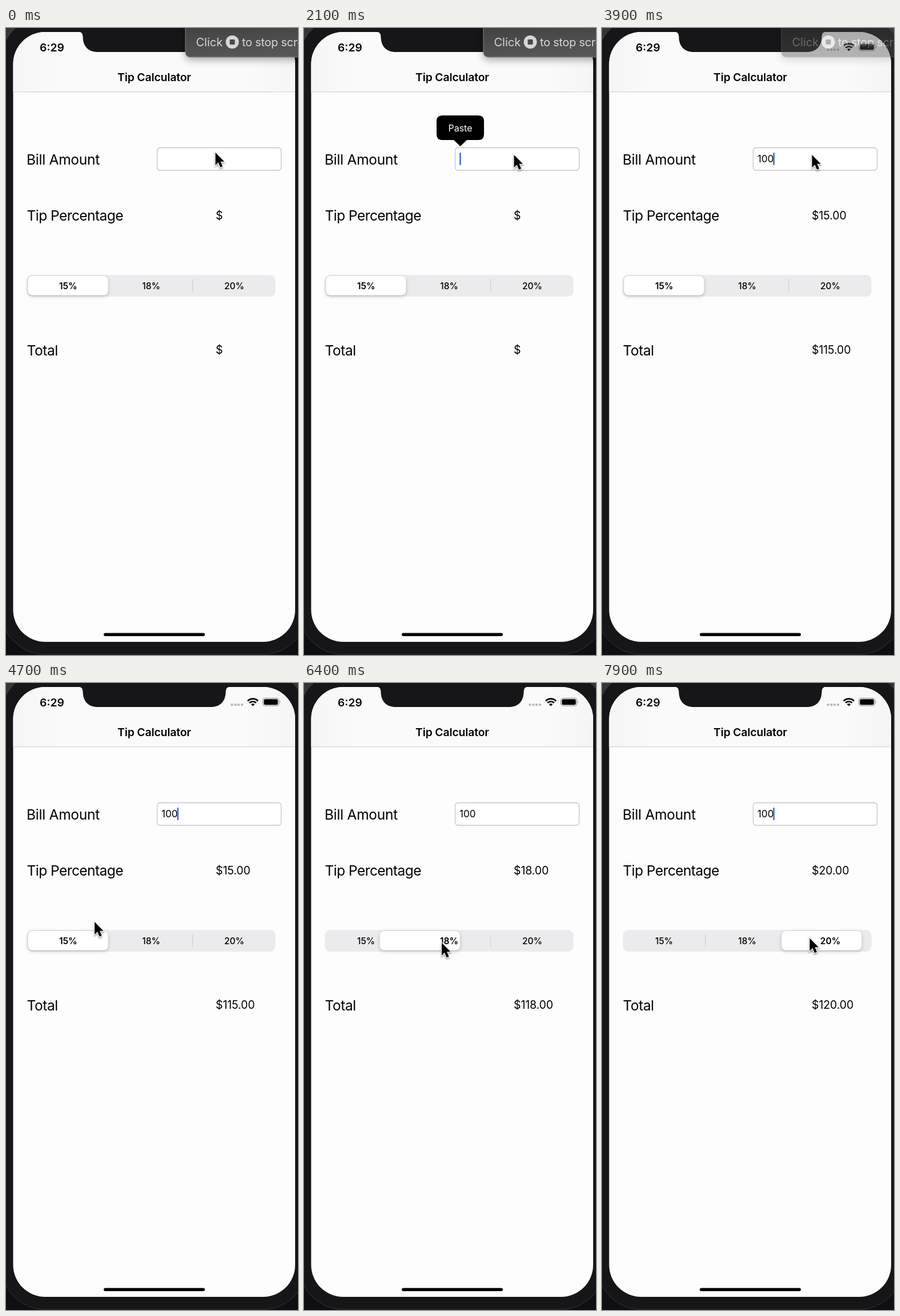
Recreate the animation shown at these times as an HTML page. Size 511 by 1097 pixels, loop 8 s.

```html
<!DOCTYPE html>
<html lang="en">
<head>
<meta charset="utf-8">
<title>Tip Calculator</title>
<style>
  html, body { margin: 0; width: 100%; height: 100%; overflow: hidden; background: #0e0f12; }
  svg { display: block; width: 511px; height: 1097px; font-family: Inter, Roboto, sans-serif; }
  .label { font-size: 24.5px; }
  .amount { font-size: 19.5px; letter-spacing: -.1px; }
  .segment { font-size: 15.5px; font-weight: 500; text-anchor: middle; }
  .bold { font-size: 19.3px; font-weight: 600; }
  .soft { filter: drop-shadow(0 2px 3px rgba(0, 0, 0, .22)); }
  #cursor { filter: drop-shadow(0 2px 1.5px rgba(0, 0, 0, .4)); }
  #toast { filter: drop-shadow(0 4px 7px rgba(0, 0, 0, .35)); }
</style>
</head>
<body>
<svg viewBox="0 0 511 1097">
  <defs>
    <linearGradient id="nav">
      <stop offset="0" stop-color="#f5f5f6"/><stop offset=".17" stop-color="#fafafb"/>
      <stop offset=".83" stop-color="#fafafb"/><stop offset="1" stop-color="#f5f5f6"/>
    </linearGradient>
    <linearGradient id="toastFill" x2=".3" y2="1">
      <stop offset="0" stop-color="#3e3e3f"/><stop offset="1" stop-color="#565657"/>
    </linearGradient>
    <clipPath id="screen"><rect x="12.5" y="7" width="493.5" height="1067" rx="56"/></clipPath>
    <clipPath id="wedge"><path d="M432 40.5L416 24.5H448Z"/></clipPath>
  </defs>

  <rect width="511" height="60" fill="#34373a"/>
  <rect x="-9" y="-20" width="536" height="1116" rx="78" fill="#161517" stroke="#363638"/>
  <g clip-path="url(#screen)">
    <rect width="511" height="1097" fill="#fefdfe"/>
    <rect width="511" height="111" fill="url(#nav)"/>
    <rect y="111" width="511" height="1.2" fill="#d3d3d6"/>
  </g>
  <path d="M127 6.5Q134.500 7 134.500 15C134.500 32 144 42 161 42H358C375 42 384.500 32 384.500 15Q384.500 7 392 6.500Z" fill="#161517"/>
  <rect x="171" y="1058.500" width="177" height="5.500" rx="2.750"/>

  <text class="bold" x="59" y="40.500">6:29</text>
  <text class="bold" x="259.500" y="92.500" text-anchor="middle" letter-spacing="-.1">Tip Calculator</text>
  <g fill="#b9b9bc">
    <circle cx="395.500" cy="38" r="2.200"/><circle cx="401.500" cy="38" r="2.200"/>
    <circle cx="407" cy="38" r="2.200"/><circle cx="413" cy="38" r="2.200"/>
  </g>
  <g clip-path="url(#wedge)" fill="none" stroke="#000" stroke-width="2.800">
    <circle cx="432" cy="40.500" r="12.800"/><circle cx="432" cy="40.500" r="8.200"/>
    <circle cx="432" cy="40.500" r="2.300" stroke-width="4.600"/>
  </g>
  <rect x="449.500" y="26.500" width="28" height="13.500" rx="4" fill="none" stroke="#8e8e90" stroke-width="1.200"/>
  <rect x="451.300" y="28.300" width="24.400" height="9.900" rx="2.300"/>
  <path d="M479 31Q481 33.200 479 35.500Z" fill="#8e8e90"/>

  <text class="label" x="36" y="239" letter-spacing="-.25">Bill Amount</text>
  <text class="label" x="36.500" y="337" letter-spacing="-.55">Tip Percentage</text>
  <text class="label" x="36.500" y="573" letter-spacing="-.45">Total</text>
  <rect x="264.500" y="209.500" width="217" height="39.500" rx="5" fill="#fff" stroke="#c5c5ca" stroke-width="1.300"/>
  <text id="bill" x="272" y="235" font-size="17"></text>
  <rect id="caret" y="218" width="2.400" height="22" rx="1" fill="#3d60dc"/>
  <text id="tip" class="amount" x="367" y="335"></text>
  <text id="total" class="amount" x="367" y="570"></text>

  <rect x="36.500" y="432" width="435" height="38" rx="9.500" fill="#ebeaec"/>
  <g fill="#cfcfd2">
    <rect id="divider0" x="180.500" y="440" width="1.200" height="22"/>
    <rect id="divider1" x="326" y="440" width="1.200" height="22"/>
  </g>
  <rect id="pill" class="soft" y="434" width="140" height="33.500" rx="8" fill="#fff"/>
  <text class="segment" x="108.700" y="457">15%</text>
  <text class="segment" x="254" y="457">18%</text>
  <text class="segment" x="399.500" y="457">20%</text>

  <g id="paste">
    <path d="M242 153H305Q315 153 315 163V186Q315 196 305 196H285L273.500 207L262 196H242Q232 196 232 186V163Q232 153 242 153Z"/>
    <text x="273.500" y="180.500" font-size="16" fill="#fff" text-anchor="middle">Paste</text>
  </g>
  <g id="toast">
    <rect x="314" y="-12" width="240" height="63" rx="8" fill="url(#toastFill)" stroke="#88888a"/>
    <g fill="#d6d6d7" font-size="20">
      <text x="332.500" y="31.500">Click</text>
      <circle cx="396" cy="24.500" r="11.500"/>
      <rect x="391.500" y="20" width="9" height="9" rx="1.500" fill="#4a4a4b"/>
      <text x="413" y="31.500" letter-spacing="-.3">to stop screen</text>
    </g>
  </g>
  <path id="cursor" d="M0 0V22L5 17.300L8.600 25.800L12.600 24.100L9 15.800H15.500Z" stroke="#fff" stroke-width="2.200" paint-order="stroke"/>
</svg>

<script>
const LOOP = 8000, STEP = 100;
const $ = id => document.getElementById(id);
const segments = document.querySelectorAll('.segment');
const clamp = v => Math.max(0, Math.min(1, v));
const ramp = (t, start, length) => clamp((t - start) / length);
const ease = u => u * u * (3 - 2 * u);
const money = v => '$' + v.toFixed(2);

// Pointer tip: time, x, y
const path = [
  [0, 366.5, 218], [200, 367.5, 222], [4200, 367.5, 222], [4300, 330, 256],
  [4600, 173.5, 402], [4700, 155, 418], [4900, 143, 432], [5500, 190, 463],
  [6000, 241, 454.5], [6700, 241, 454.5], [7000, 315, 449], [7300, 363.5, 446.5], [LOOP, 363.5, 446.5]
];

function pointerAt(t) {
  const i = path.findIndex(key => key[0] > t);
  const [t0, x0, y0] = path[i - 1], [t1, x1, y1] = path[i];
  const u = (t - t0) / (t1 - t0);
  return [x0 + (x1 - x0) * u, y0 + (y1 - y0) * u];
}

function caretAlpha(t) {
  if (t < 1000) return 0;
  if (t < 3500) return 1;
  const phase = (t - 3500) % 1000;
  return phase < 600 ? 1 : phase < 700 ? 0.5 : 0;
}

function draw(t) {
  const digits = [2700, 3100, 3500].filter(k => t >= k).length;
  const bill = '100'.slice(0, digits);
  const selected = (t >= 6200) + (t >= 7620);
  const tip = bill * [0.15, 0.18, 0.2][selected];
  $('bill').textContent = bill;
  $('tip').textContent = bill ? money(tip) : '$';
  $('total').textContent = bill ? money(+bill + tip) : '$';

  $('caret').setAttribute('x', [272.3, 278.8, 289.2, 299.5][digits]);
  $('caret').setAttribute('opacity', caretAlpha(t));

  const slide = ease(ramp(t, 6190, 350)) + ease(ramp(t, 7620, 350));
  $('pill').setAttribute('x', 38.5 + 145.5 * slide);
  segments.forEach((s, i) => s.style.fontWeight = i === selected ? 600 : 500);
  $('divider0').setAttribute('opacity', clamp((slide - 1) * 2));
  $('divider1').setAttribute('opacity', clamp((1 - slide) * 2));

  $('paste').setAttribute('opacity', ramp(t, 1800, 250) - ramp(t, 2500, 250));
  $('toast').setAttribute('opacity', 1 - ramp(t, 3700, 350));
  $('cursor').setAttribute('transform', `translate(${pointerAt(t)})`);
}

const begin = performance.now();
function tick() {
  const t = (performance.now() - begin) % LOOP;
  draw(Math.floor(t / STEP) * STEP);
  requestAnimationFrame(tick);
}
tick();
</script>
</body>
</html>
```
